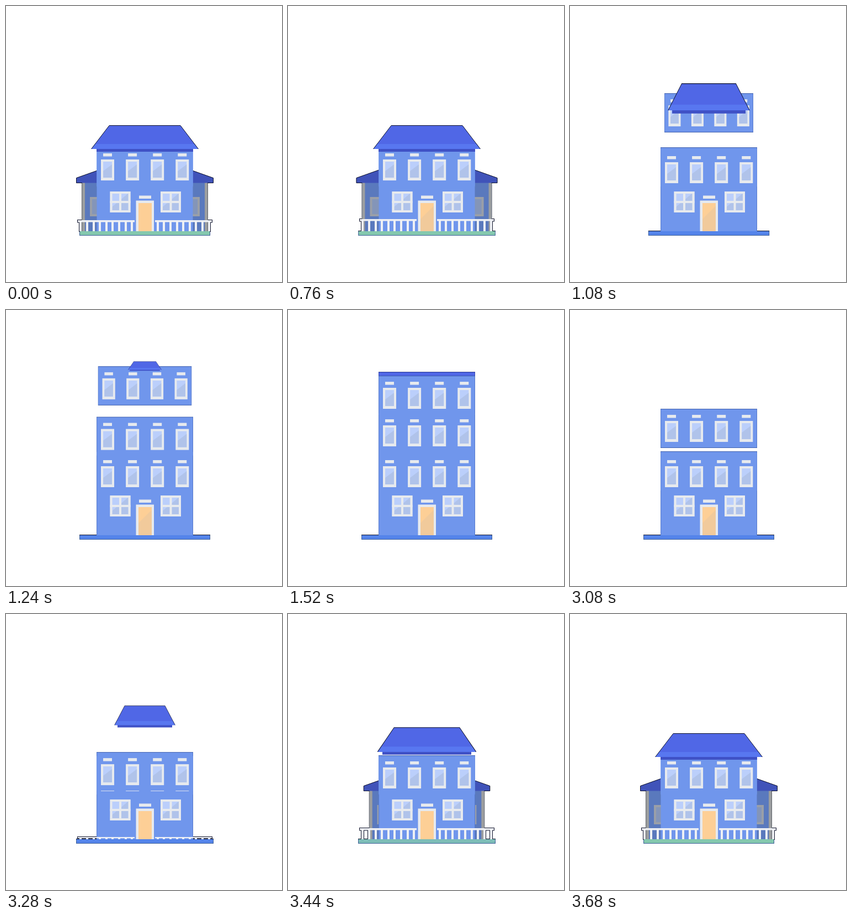
Animation, 500 px wide and 500 px high, one loop 4.4 s. Source, as an HTML page with a canvas:

```html
<!DOCTYPE html>
<html lang="en">
<head>
<meta charset="utf-8">
<title>House to apartment block</title>
<style>
html, body { margin: 0; height: 100%; overflow: hidden; background: #fff; }
canvas { display: block; width: 500px; height: 500px; }
</style>
</head>
<body>
<canvas id="c" width="500" height="500"></canvas>
<script>
const g = document.getElementById('c').getContext('2d');
const LOOP = 4400, STEP = 40, MID = 251.5;
const WALL = '#7096ec', FRAME = '#e7eaee', RAIL = '#eef0f4';
const LINE = '#10142c', EDGE = '#3e5fae';

const smooth = u => u * u * (3 - 2 * u);
const speedUp = u => u * u;
const slowDown = u => u * (2 - u);
const windUp = u => u * u - .28 * Math.sin(Math.PI * u);
const settle = u => 1 - windUp(1 - u);

const mix = (a, b, p) => a + (b - a) * p;
const part = (t, start, length) => Math.min(1, Math.max(0, (t - start) / length));
const bump = (t, start, length) => Math.sin(Math.PI * part(t, start, length));

// 0 while a house, 1 while an apartment block
const change = (t, out, outTime, outEase, back, backTime, backEase) => t < 2400
  ? outEase(part(t, out, outTime))
  : 1 - backEase(part(t, back, backTime));

function rect(color, x, y, w, h) {
  g.fillStyle = color;
  g.fillRect(x, y, w, h);
}

// The outline follows the points but leaves the closing side open
function poly(color, points, line) {
  g.beginPath();
  points.forEach(([x, y]) => g.lineTo(x, y));
  g.fillStyle = color;
  g.fill();
  if (!line) return;
  g.strokeStyle = line;
  g.lineWidth = 1;
  g.stroke();
}

function scaled(sx, sy, cx, cy, draw) {
  g.save();
  g.translate(cx, cy);
  g.scale(sx, sy);
  g.translate(-cx, -cy);
  draw();
  g.restore();
}

function mirrored(draw) {
  draw();
  scaled(-1, 1, MID, 0, draw);
}

function windowRow(y) {
  for (let i = 0; i < 4; i++) {
    const x = 172 + 45.1 * i;
    rect(FRAME, x + 4, y + 11, 16, 5.5);
    rect(FRAME, x, y + 22, 24, 38);
    rect('#bbcffb', x + 4, y + 26, 16, 29);
    poly('#b0c3ea', [[x + 20, y + 31], [x + 20, y + 55], [x + 4, y + 55], [x + 4, y + 43]]);
  }
}

function bigWindow(x) {
  rect('#bbcffb', x, 336, 37, 38);
  poly('#b0c3ea', [[x + 37, 336], [x + 37, 374], [x, 374], [x, 367]]);
  g.strokeStyle = FRAME;
  g.lineWidth = 4;
  g.strokeRect(x + 2, 338, 33, 34);
  rect(FRAME, x + 16.5, 336, 4, 38);
  rect(FRAME, x, 353, 37, 4);
}

function door(shaded) {
  rect(FRAME, 241, 343.5, 22, 5.5);
  rect(FRAME, 235.5, 352.5, 32.5, 55.5);
  rect('#fdcf96', 240, 357, 24, 51);
  if (shaded) poly('#f1ca9b', [[264, 362], [264, 408], [240, 408], [240, 386]]);
}

function wing(dx) {
  mirrored(() => {
    g.translate(dx, 0);
    rect('#5a79bd', 138, 320, 60, 88);
    rect('#9c9e9f', 138, 320, 5, 88);
    rect('#5c6068', 137, 320, 1, 88);
    rect('#9a9fa8', 152, 346, 24, 35);
    rect('#8495b8', 156, 350, 16, 27);
    poly('#4053b9', [[198, 286.5], [127.5, 311.5], [127.5, 320.5], [198, 320.5]]);
    poly('#4053b9', [[198, 286.5], [127.5, 311.5], [127.5, 320.5], [138, 320.5]], LINE);
    g.translate(-dx, 0);
  });
}

function fence(h, color, grow) {
  if (h <= 0) return;
  const top = Math.round(408 - 20 * h);
  const bar = (x, y, w, height) =>
    rect(color, x - grow, y - grow, w + 2 * grow, height + 2 * grow);
  mirrored(() => {
    bar(130, top, 103, 3.5 * Math.min(1, h * 3));
    for (let i = 0; i < 9; i++) bar(Math.round(133.4 + i * 11.6), top, 4, 408 - top);
  });
}

function roof(w, h, y) {
  if (w <= 0) return;
  g.save();
  g.translate(0, y - 240);
  scaled(w, h, MID, 240, () => {
    rect('#3f51c6', 164, 258, 175, 6);
    poly('#5067e6', [[154.5, 259], [187, 216.5], [316, 216.5], [348.5, 259]]);
    poly('#5877f0', [[154.5, 259], [161, 250], [342, 250], [348.5, 259]]);
    poly('#0000', [[154.5, 259], [187, 216.5], [316, 216.5], [348.5, 259]], LINE);
  });
  g.restore();
}

function block(y, w) {
  scaled(w, 1, MID, 0, () => {
    rect(WALL, 164.5, y + 1, 174, 69);
    windowRow(y);
  });
}

function edge(y, w, h) {
  rect(EDGE, MID - 87.5 * w, y, 175 * w, h);
}

function baseHalf(t) {
  const u = part(t, 720, 520);
  return 118.5 + 13 * (1 - .4 * u) * Math.sin(2 * Math.PI * u) + 12 * bump(t, 3240, 240);
}

function frame(now) {
  const t = Math.floor(now % LOOP / STEP) * STEP;
  const apart = t > 820 && t < 3560;

  const lift = change(t, 850, 470, smooth, 3095, 465, slowDown);
  const roofW = 1 - change(t, 850, 470, speedUp, 3135, 425, slowDown);
  const roofH = roofW * (1 + 2 * lift * (1 - lift));
  const topY = mix(256, 119, change(t, 950, 450, settle, 2860, 480, smooth));
  const topW = 1 - .085 * bump(t, 950, 330);
  const midY = mix(257, 187, change(t, 1080, 400, settle, 2840, 240, speedUp));
  const cap = change(t, 1200, 280, smooth, 2790, 200, slowDown);
  const hide = change(t, 730, 310, windUp, 3320, 360, settle);
  const fenceH = 1 - change(t, 720, 200, windUp, 3250, 400, settle);
  const blue = change(t, 860, 140, smooth, 3320, 160, smooth);
  const half = baseHalf(t);

  rect('#fff', 0, 0, 500, 500);

  // Dark edges lie under everything so they show only against the sky
  rect(LINE, MID - half, 407, 2 * half, 1);
  rect('#3c5f98', MID - half, 408, 2 * half, 8);
  fence(fenceH, LINE, 1);
  wing(48 * hide);
  if (cap > 0) {
    const w = 175 * cap;
    rect('#28368c', MID - w / 2, topY - 7, w, 8);
    rect('#5067e6', MID - w / 2 + .5, topY - 6, w - 1, 7);
  }
  if (apart) {
    edge(midY, 1, 70);
    edge(topY, topW, 71);
    edge(256, 1, 152);
  }

  block(midY, 1);
  rect(WALL, 164.5, 257, 174, 151);
  windowRow(261);
  bigWindow(188.5);
  bigWindow(280);
  block(topY, topW);
  door(t >= 760 && t < 3200);
  roof(roofW, roofH, mix(240, 90, lift));

  const shade = (a, b) => Math.round(mix(a, b, blue));
  rect(`rgb(${shade(132, 84)},${shade(200, 132)},${shade(174, 234)})`,
    MID - half + 1, 408, 2 * half - 2, 7);
  fence(fenceH, RAIL, 0);

  requestAnimationFrame(() => frame(performance.now() - start));
}

const start = performance.now();
frame(0);
</script>
</body>
</html>
```
